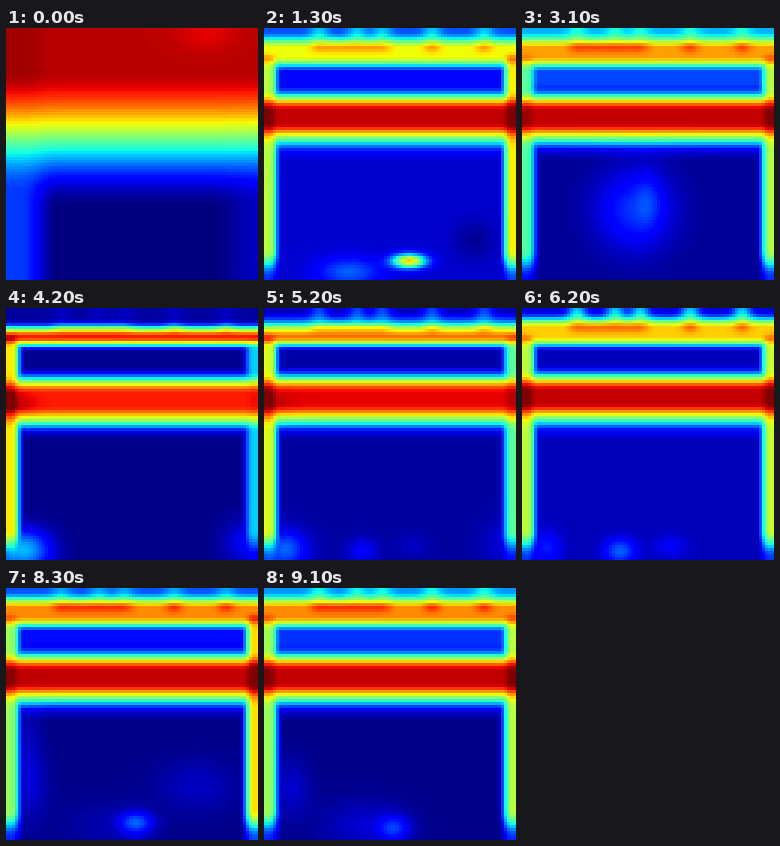
A matplotlib script that plays this animation: 252 px wide and 252 px high, repeating every 9200 ms.

```python
import numpy as np
import matplotlib.pyplot as plt
from matplotlib.animation import FuncAnimation

SIZE, CELLS, FRAMES, STEP = 252, 84, 92, 100

axis = (np.arange(CELLS) + 0.5) * SIZE / CELLS
X, Y = np.meshgrid(axis, axis)


def ramp(v, start, end):
    u = np.clip((v - start) / (end - start), 0, 1)
    return u * u * (3 - 2 * u)


def plateau(v, a, b, c, d):
    return ramp(v, a, b) * (1 - ramp(v, c, d))


def bell(v, centre, width):
    return np.exp(-((v - centre) / width) ** 2 / 2)


def spot(x, y, width, height, peak):
    return peak * bell(X, x, width) * bell(Y, y, height)


BUMPS = sum(bell(X, x, 7) for x in (55, 93, 118, 168, 220)) * bell(Y, 4, 6)
GLOW = (plateau(X, 40, 56, 115, 135) + bell(X, 168, 6) + bell(X, 220, 6)) * bell(Y, 19, 4)


def gradient():
    """Dark red sky fading to deep blue, lighter along the sides."""
    centre = 0.95 * (1 - ramp(Y, 42, 182))
    left = 0.97 - 0.79 * ramp(Y, 42, 165)
    right = 0.95 - 0.89 * ramp(Y, 42, 175)
    field = centre + (1 - ramp(X, 15, 52)) * (left - centre)
    field += ramp(X, 205, 252) * (right - centre)
    return field + spot(200, 5, 22, 12, -0.04)


def court(sky, bumps, ridge, floor, left, right, spots, lag=0):
    """Soft bands for sky, ridge, gap, bar and floor, framed by two walls.

    lag pushes the ridge and the bar downwards.
    """
    top, shift = 3 + 9 * lag, 3 * lag
    field = sky * (1 - ramp(Y, top, top + 15)) + bumps * BUMPS
    field += ridge * plateau(Y, top, top + 17, 29, 44) + 0.1 * GLOW
    field += 0.65 * sky * plateau(Y, 30, 42, 54, 66)
    field += (0.94 - 0.06 * lag) * plateau(Y - shift, 55, 83, 95, 124)
    field += floor * ramp(Y, 105, 125)
    field += 0.1 * plateau(Y, 104, 116, 116, 134)
    field += sum(spot(*s) for s in spots)
    reach = ramp(Y, 18, 32) * (1 - 0.7 * ramp(Y, 222, 250))
    walls = reach * (left * (1 - ramp(X, 5, 20)) + right * ramp(X, 233, 247))
    return np.cbrt(np.clip(field, 0, 1) ** 3 + walls ** 3)


POSES = {
    1300: court(0.20, 0.13, 0.64, 0.07, 0.57, 0.65,
                [(145, 233, 12, 5, 0.62), (85, 244, 22, 10, 0.15), (210, 212, 14, 14, -0.05)]),
    3100: court(0.30, 0.09, 0.74, 0.02, 0.45, 0.56,
                [(112, 182, 27, 28, 0.15), (126, 172, 9, 20, 0.06)]),
    4200: court(0.03, 0.03, 0.88, 0.01, 0.66, 0.33,
                [(18, 242, 18, 14, 0.30), (10, 97, 14, 9, 0.06), (240, 235, 16, 16, 0.10)], lag=1),
    6200: court(0.08, 0.26, 0.69, 0.05, 0.58, 0.59,
                [(98, 243, 11, 9, 0.17), (148, 238, 12, 8, 0.06), (25, 240, 10, 12, 0.10)]),
    7500: court(0.14, 0.07, 0.76, 0.01, 0.53, 0.77,
                [(130, 233, 12, 7, 0.28), (190, 198, 28, 18, 0.10), (24, 175, 9, 38, 0.10)]),
    9100: court(0.27, 0.11, 0.76, 0.01, 0.54, 0.57,
                [(130, 240, 11, 9, 0.15), (98, 238, 30, 18, 0.06), (28, 200, 12, 20, 0.06)]),
}
TIMES = list(POSES)
START = gradient()


def field_at(ms):
    clamped = max(ms, TIMES[0])
    k = min(np.searchsorted(TIMES, clamped, side="right") - 1, len(TIMES) - 2)
    before, after = TIMES[k], TIMES[k + 1]
    mix = ramp(clamped, before, after)
    formed = (1 - mix) * POSES[before] + mix * POSES[after]
    return START + ramp(ms, 0, 900) * (formed - START)


fig = plt.figure(figsize=(SIZE / 100, SIZE / 100), dpi=100)
ax = fig.add_axes([0, 0, 1, 1])
ax.axis("off")
image = ax.imshow(START, cmap="jet", vmin=0, vmax=1, interpolation="nearest", aspect="auto")


def draw(frame):
    image.set_data(np.clip(field_at(frame * STEP), 0, 1))
    return (image,)


anim = FuncAnimation(fig, draw, frames=FRAMES, interval=STEP, repeat=True, repeat_delay=0)
plt.show()
```
